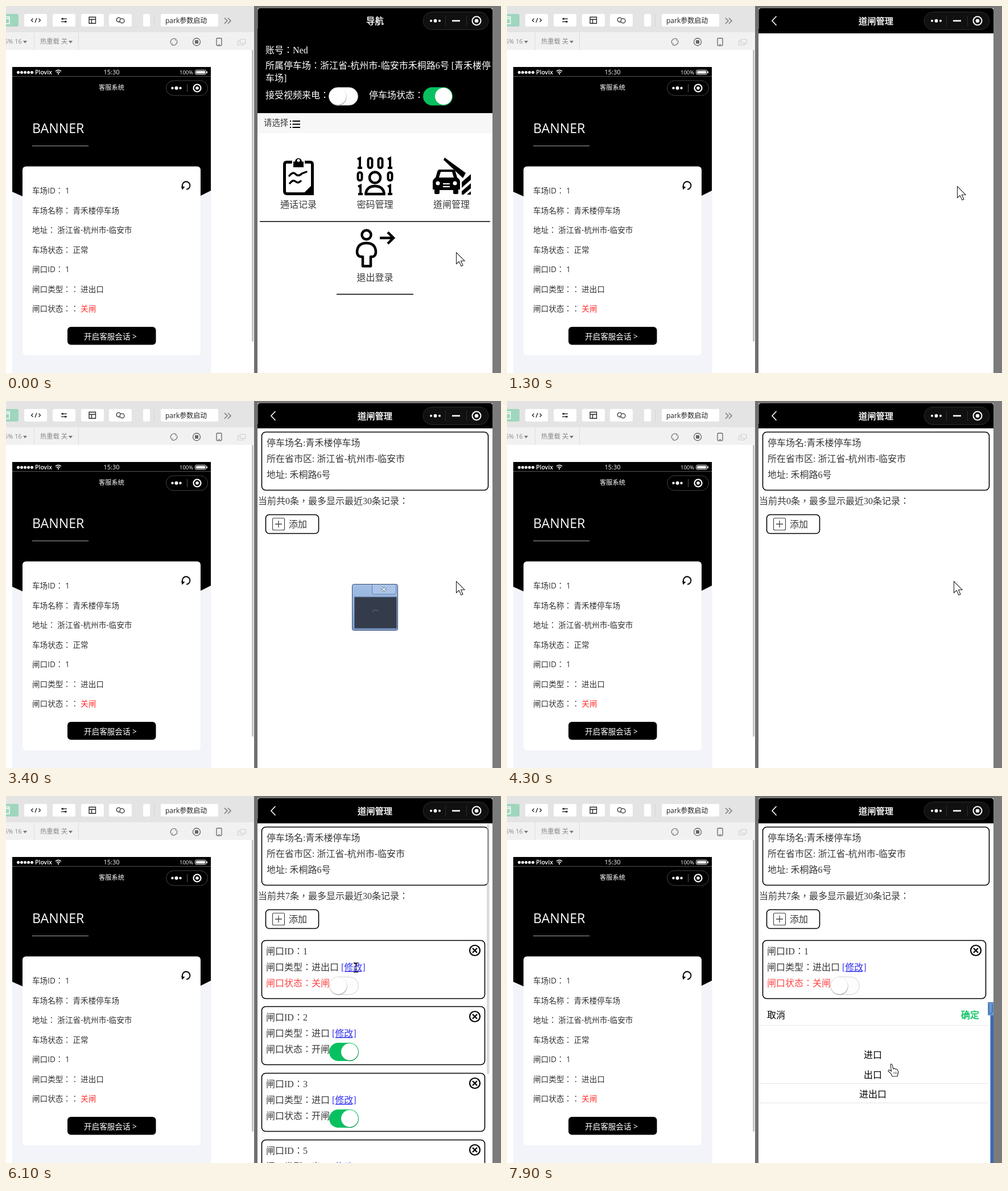
Write an HTML page that moves like this. It is 870 by 644 pixels and loops after 8 s.

```html
<!DOCTYPE html>
<html lang="zh-TW">
<head>
<meta charset="utf-8">
<title>道闸管理</title>
<style>
html, body { margin: 0; width: 100%; height: 100%; overflow: hidden; background: #fff; }
svg { display: block; width: 870px; height: 644px; }
text { white-space: pre; text-spacing-trim: space-all; }
.ui { font-family: 'Open Sans', 'Noto Sans CJK TC', 'Noto Sans CJK', sans-serif; }
.app { font-family: 'Liberation Serif', 'Noto Sans CJK TC', 'Noto Sans CJK', serif; font-weight: 300; }
.head { font-family: 'Noto Sans CJK SC', 'Noto Sans CJK', sans-serif; }
.strong { stroke-width: .45px; }
</style>
</head>
<body>
<svg id="stage" viewBox="0 0 870 644" width="870" height="644"></svg>
<script>
const LOT = '青禾楼停车场', CITY = '浙江省-杭州市-临安市', ROAD = '禾桐路6号';
const INK = '#383838';

const text = (x, y, s, size, fill, cls, extra = '') =>
  `<text x="${x}" y="${y}" font-size="${size}" fill="${fill}" class="${cls}" ${extra}>${s}</text>`;
const ui = (x, y, s, size, fill, extra) => text(x, y, s, size, fill, 'ui', extra);
const app = (x, y, s, fill = INK, extra) => text(x, y, s, 16, fill, 'app', extra);
const strong = (x, y, s, size, fill, extra = '') => text(x, y, s, size, fill, 'head strong', `stroke="${fill}" ${extra}`);
const mid = 'text-anchor="middle"';
const box = (x, y, w, h, fill, r = 0, extra = '') =>
  `<rect x="${x}" y="${y}" width="${w}" height="${h}" fill="${fill}" rx="${r}" ${extra}/>`;
const card = (x, y, w, h, r) => box(x, y, w, h, '#fff', r, 'stroke="#000" stroke-width="1.6"');
const dot = (x, y, r, fill, extra = '') => `<circle cx="${x}" cy="${y}" r="${r}" fill="${fill}" ${extra}/>`;
const path = (d, color, w = 1, extra = '') =>
  `<path d="${d}" fill="none" stroke="${color}" stroke-width="${w}" ${extra}/>`;
const shape = (d, fill, extra = '') => `<path d="${d}" fill="${fill}" ${extra}/>`;
const ring = (x, y, r, color, w) => dot(x, y, r, 'none', `stroke="${color}" stroke-width="${w}"`);
const group = (id, s) => `<g id="${id}">${s}</g>`;

function toggle(x, y, on) {
  const track = on
    ? box(x, y, 52, 32, '#07c160', 16)
    : box(x + .5, y + .5, 51, 31, '#fdfdfd', 15.5, 'stroke="#d2d2d2"');
  const cx = on ? x + 36 : x + 16, cy = y + 16;
  return track + dot(cx + .3, cy + 1, 15.3, on ? '#04994a' : '#aaa') + dot(cx, cy, 15, '#fff');
}

function toolbar() {
  let s = box(0, 0, 436, 46, '#e4e4e4') + box(0, 46, 436, 31, '#f1f1f1') +
    box(-20, 14, 42, 22, '#9fd6bd', 3) + path('M0 19H6V31H0M0 22H6', '#fff', 1.3);
  for (const x of [32, 82, 132, 181]) s += box(x, 14, 40, 22, '#fff', 3);
  s += box(241, 14, 12, 22, '#fff', 3) + path('M260.5 14V36', '#d5d5d5') + box(272, 14, 101, 22, '#fff', 2);
  s += path('M47.5 22L44.5 25L47.5 28M57.5 22L60.5 25L57.5 28M54 21L51 29', '#222', 1.3);
  s += path('M97 22.5H107M97 27.5H107', '#333', 1.3) + dot(99.5, 22.5, 1.7, '#333') + dot(104.5, 27.5, 1.7, '#333');
  s += path('M146 19.5H157.5V30.5H146ZM146 23.5H157.5M150.5 23.5V30.5', '#222', 1.3);
  s += path('M200 28H198A3.8 3.8 0 1 1 201.5 22.5', '#333', 1.3) + ring(204, 26, 3.9, '#333', 1.3);
  s += ui(280, 30, 'park参数启动', 12, '#222');
  s += path('M384 21L389 26L384 31M390 21L395 26L390 31', '#808080', 1.7);
  s += ui(-3, 66, '5% 16', 11, '#888') + shape('M30 61H37L33.5 65.5Z', '#777');
  s += path('M49.5 46V77M127.5 46V77', '#dedede');
  s += ui(60, 66, '热重载 关', 11.3, '#888') + shape('M110 61H117L113.5 65.5Z', '#777');
  s += path('M290 66A6 6 0 0 1 299 58.5M300 60A6 6 0 0 1 291 67.5', '#777', 1.3) +
    path('M296 57L299.5 59L297 61M294 69L290.5 67L293 65', '#777');
  s += ring(335, 63, 6.5, '#666', 1.3) + box(332, 60, 6, 6, '#666');
  s += box(370, 56.5, 9, 13, 'none', 1.5, 'stroke="#666" stroke-width="1.3"') + path('M373 67.5H376', '#666');
  s += path('M411.5 58.5H421V65.5H411.5ZM411 61H407.5V68.5H417.5V66', '#d0d0d0', 1.2);
  return s;
}

function phone() {
  let s = box(11, 107, 349.5, 540, '#f3f4f9') + shape('M11 107H360V324L342 333L185 400L29 334L11 326Z', '#000');
  for (let i = 0; i < 5; i++) s += dot(21.5 + i * 6, 116.5, 2.5, '#fff');
  s += ui(51, 120, 'Plovix', 10.5, '#fff', 'font-weight="600"');
  s += path('M87 114.5Q92 110.5 97 114.5M89 117Q92 114.5 95 117', '#fff', 1.3) + dot(92, 119, 1.2, '#fff');
  s += ui(185.5, 120, '15:30', 11, '#fff', mid) + ui(305, 120, '100%', 9.5, '#fff');
  s += box(332.5, 112.5, 19, 7.5, 'none', 2, 'stroke="#fff"') + box(334, 114, 16, 4.5, '#fff', 1) + box(352.5, 114.5, 1.5, 3.5, '#fff');
  s += path('M11 123.5H360', '#555') + ui(185.5, 147, '客服系统', 11.2, '#fff', mid);
  s += box(281.5, 131, 73, 26, '#000', 13, 'stroke="#444"') + path('M318.5 137V151', '#555');
  s += dot(292.5, 144, 2.2, '#fff') + dot(299.5, 144, 3, '#fff') + dot(306.5, 144, 2.2, '#fff');
  s += ring(336, 144, 6.5, '#fff', 2.2) + dot(336, 144, 2.8, '#fff');
  s += ui(46, 223, 'BANNER', 23.2, '#fff') + path('M46 245.5H145', '#a5a5a5');
  s += box(29, 281.5, 313, 331.5, '#fff', 6);
  s += path('M311.5 319.5A6.8 6.8 0 1 1 317 321.8', '#111', 2.1) + shape('M308 316L314.5 317.5L309.5 322.5Z', '#111');
  const rows = ['车场ID： 1', '车场名称： ' + LOT, '地址： ' + CITY, '车场状态： 正常', '闸口ID： 1',
    '闸口类型：： 进出口', '闸口状态：： <tspan fill="#f33">关闸</tspan>'];
  rows.forEach((r, i) => s += ui(46, 329 + i * 34.5, r, 13.6, '#333'));
  s += box(108, 563, 155.5, 31.5, '#000', 6) + ui(137, 585, '开启客服会话 &gt;', 13.6, '#fff');
  return s + box(432, 77, 3, 512, '#c4c4c4', 1.5);
}

function icons() {
  const round = 'stroke-linecap="round" stroke-linejoin="round"';
  // clipboard
  let s = path('M503 274H493Q489.5 274 489.5 278V325Q489.5 329.5 494 329.5H526L538.5 317V278Q538.5 274 535 274H525', '#000', 5) +
    shape('M541 311V332H520Z', '#000') + shape('M505 283V273H508A6 6 0 1 1 520 273H523V283Z', '#000') + dot(514, 271, 2.5, '#fff') +
    path('M498 298Q504 290 509 295T520 294L528 291M499 311Q504 304 509 308T518 307', '#000', 3.4, round);
  // digits and person
  const one = (x, y, h) => path(`M${x - 4} ${y + 4}L${x} ${y + 2}V${y + h - 2}M${x - 4} ${y + h - 2}H${x + 4}`, '#000', 4);
  const zero = (x, y, h) => box(x - 3.5, y + 2, 7, h - 4, 'none', 3.5, 'stroke="#000" stroke-width="4"');
  s += one(622, 265, 21) + zero(640, 265, 21) + zero(658, 265, 21) + one(675, 265, 21) +
    zero(622, 290, 18) + zero(675, 290, 18) + one(623, 313, 19) + one(675, 313, 19) +
    ring(648.5, 301, 9.5, '#000', 4.5) + path('M632.5 330V328Q635 316 648.5 316T664.5 328V330Z', '#000', 4.5);
  // car and barrier
  s += shape('M762 287H785Q789 287 790 291L793 301Q798 304 798 309V322H795V328Q795 330 793 330H788Q786 330 786 328V323H762V328Q762 330 760 330H755Q753 330 753 328V322H750V309Q750 304 755 301L758 291Q759 287 762 287Z', '#000') +
    shape('M764 291H784L787 301H761Z', '#fff') + dot(759, 311, 3.5, '#fff') + dot(789, 311, 3.5, '#fff') + path('M768 312H780M768 317H780', '#fff', 1.8) +
    shape('M771 266L808 293L803 302L769 270Z', '#000') +
    shape('M817 295V305L801 319V309ZM817 311V320L804 331H801V325ZM817 325V331H810Z', '#000');
  // leaving person
  s += ring(633.5, 401.5, 8, '#000', 4.5) +
    path('M627 456.5V440Q617 441 617 431Q618 416 633.5 416T650 431Q650 441 641 440V456.5Z', '#000', 4.5, round) +
    path('M657 407H680M671 397L681 407L671 417', '#000', 4.5);
  return s;
}

function navPage() {
  const white = '#fff';
  let s = box(442, 40, 413, 604, '#fff') + box(442, 40, 413, 148, '#000') + strong(648.5, 31.5, '导航', 15.5, white, mid);
  s += app(456, 83, '账号：Ned', white) + app(456, 110, `所属停车场：${CITY}${ROAD} [${LOT.slice(0, 4)}`, white) +
    app(456, 132, LOT.slice(4) + ']', white) + app(456, 162, '接受视频来电：', white) + app(638, 162, '停车场状态：', white);
  s += toggle(567, 142.5, false) + toggle(733, 142.5, true);
  s += box(442, 188, 413, 35, '#f7f7f7') + text(453, 210, '请选择', 14.4, INK, 'app');
  s += path('M503.5 202H517M503.5 207.5H517M503.5 213H517M499 202H501M499 207.5H501M499 213H501', '#000', 1.8);
  s += icons();
  ['通话记录', '密码管理', '道闸管理'].forEach((n, i) => s += app(514 + i * 134.5, 354, n, INK, mid));
  s += app(648.5, 482, '退出登录', INK, mid);
  return s + path('M446 378.3H851M581 505.8H716', '#000', 1.4);
}

function gate(i, id, kind, open) {
  const y = Math.floor(i * 116.7), state = open ? INK : '#f44';
  const link = '<tspan fill="#33e" text-decoration="underline">[修改]</tspan>';
  return `<g transform="translate(0 ${y})">` + card(449.5, 253.5, 392, 102, 7) + app(457, 278, '闸口ID：' + id) +
    app(457, 306, `闸口类型：${kind} ${link}`) + app(457, 334, '闸口状态：' + (open ? '开闸' : '关闸'), state) +
    toggle(568, 317, open) + ring(824, 271, 9, '#000', 2.2) +
    path('M820 267L828 275M820 275L828 267', '#000', 2.4) + '</g>';
}

function gatePage() {
  const head = box(442, 40, 413, 604, '#fff') + box(442, 40, 413, 8, '#000') +
    strong(648.5, 31.5, '道闸管理', 15.3, '#fff', mid) + path('M473.5 18L466 26L473.5 34', '#fff', 1.6);
  const info = card(449.5, 54.5, 398, 102, 7) +
    app(458, 79, '停车场名:' + LOT) + app(458, 107, '所在省市区: ' + CITY) + app(458, 135, '地址: ' + ROAD) +
    app(443, 181, '当前共<tspan id="count">0</tspan>条，最多显示最近30条记录：') +
    card(456.5, 199.5, 93, 33, 6) +
    box(468.5, 205.5, 21, 21, 'none', 2, 'stroke="#444" stroke-width="1.2"') +
    path('M473 216H485M479 210V222', '#444', 1.3) + app(497, 222, '添加');
  const list = gate(0, 1, '进出口', false) +
    group('rest', gate(1, 2, '进口', true) + gate(2, 3, '进口', true) + gate(3, 5, '出口', true));
  return head + group('info', info) + group('list', list) + box(845, 49, 4.5, 439, '#c4c4c4', 2, 'id="bar"');
}

const modal = () =>
  box(608.5, 321.5, 80, 81, 'url(#glass)', 3, 'stroke="#3a4c6c"') +
  shape('M643.5 322V336Q643.5 339 647 339H682Q685.5 339 685.5 336V322', '#a9c4e8', 'stroke="#6580a8"') +
  path('M660.5 327.5L667.5 333.5M660.5 333.5L667.5 327.5', '#4a5870', 3.6) +
  path('M660.5 327.5L667.5 333.5M660.5 333.5L667.5 327.5', '#f4f7fb', 1.8) +
  box(612.5, 344, 74, 55, '#343c4c', 0, 'stroke="#53688c"') +
  path('M655 370A8 8 0 0 1 656 381', '#566172', 1.3, 'id="spin"');

function picker() {
  const row = (y, s) => text(643, y, s, 16, '#000', 'head', mid);
  const panel = text(457, 390, '取消', 16, '#000', 'head') + strong(798, 390, '确定', 16, '#07c160') +
    path('M443 402.5H845M443 504.5H845M443 538.5H845', '#e5e5e5') +
    row(460, '进口') + row(495, '出口') + row(529, '进出口');
  return box(443, 362, 412, 282, '#fff') + box(845, 362, 10, 23, '#6a9bd8') +
    path('M845 362.5H855M847 365V381Q852 384 853 378V365', '#315f9f', 1.2) + box(849.5, 385, 5.5, 259, '#3c69b0') +
    `<g clip-path="url(#sheet)">${group('panel', panel)}</g>`;
}

const frame = () =>
  box(436, 0, 434, 4, '#777') + box(436, 0, 6.5, 644, '#707070') + box(855, 0, 15, 644, '#7b7b7b') +
  box(442.5, 4, 412.5, 44, '#000', 4);

const capsule = () =>
  box(733, 10.5, 115, 31, '#101010', 15.5, 'stroke="#2c2c2c"') + path('M772.5 17V35M809.5 17V35', '#2c2c2c') +
  dot(747, 26, 2, '#fff') + dot(754.5, 26, 2.9, '#fff') + dot(762, 26, 2, '#fff') +
  path('M784 26H798', '#fff', 2.6) + ring(827, 26, 7.5, '#fff', 2) + dot(827, 26, 3.3, '#fff');

const cursors = () =>
  group('arrow', shape('M.5 .5V20.5L5.2 16.3L9 24.5L12 23.2L8.5 15.2H15Z', '#fff', 'stroke="#222" stroke-width="1.1"')) +
  group('ibeam', path('M-4 -8H-1L0 -7L1 -8H4M0 -7V7M-4 8H-1L0 7L1 8H4', '#111', 1.4)) +
  group('hand', shape('M1 1Q3 -1 4 2L6 9L8 8L10 9.5L12 9L13.5 11L15 14L14 18L13 22H4L2 17L-3 13Q-3 10 0 11L2.5 13Z', '#fff', 'stroke="#222" stroke-width="1.1"') +
    path('M7 14V18M9.5 14V18M12 14V18', '#444', .8));

document.getElementById('stage').innerHTML =
  '<defs><linearGradient id="glass" x2="0" y2="1"><stop stop-color="#a3bfe6"/><stop offset="1" stop-color="#7f9fce"/></linearGradient>' +
  '<clipPath id="sheet"><rect x="443" y="362" width="402" height="282"/></clipPath></defs>' +
  box(0, 0, 870, 644, '#fff') + toolbar() + phone() + frame() +
  group('nav', navPage()) + group('gates', gatePage()) + capsule() +
  group('modal', modal()) + group('picker', picker()) + group('cursor', cursors());

const $ = id => document.getElementById(id);
const show = (id, on) => $(id).style.display = on ? '' : 'none';
const clamp = (v, lo, hi) => Math.min(hi, Math.max(lo, v));

// time, x, y
const route = [[0, 791, 432], [200, 791, 432], [400, 786, 385], [700, 791, 316], [3400, 791, 316], [3800, 785, 316],
  [4700, 785, 316], [5200, 660, 308], [5400, 604, 301], [5600, 615, 301], [6300, 615, 301], [6600, 580, 320],
  [6800, 611, 300], [7200, 611, 300], [7700, 673, 470], [8000, 673, 470]];

function place(t) {
  const i = Math.max(1, route.findIndex(k => k[0] > t));
  const [t0, x0, y0] = route[i - 1], [t1, x1, y1] = route[i];
  const p = (t - t0) / (t1 - t0), e = p * p * (3 - 2 * p);
  return [x0 + (x1 - x0) * e, y0 + (y1 - y0) * e];
}

function draw(ms) {
  const t = Math.floor(ms / 100) * 100;
  show('nav', t < 1300);
  show('gates', t >= 1300);
  show('info', t >= 1700);
  show('list', t >= 4400);
  show('rest', t < 7200);
  $('count').textContent = t < 4400 ? 0 : 7;

  show('modal', t >= 1500 && t < 4200);
  $('modal').setAttribute('opacity', t < 4100 ? 1 : .4);
  const ticks = clamp(t / 100 - 16, 0, 8) + (t >= 2700) + clamp(t / 100 - 29, 0, 9) + (t >= 3900);
  $('spin').setAttribute('transform', `rotate(${(ticks - 5) * 30} 649 375.5)`);

  show('bar', t >= 4800 && t < 6200);
  $('bar').setAttribute('opacity', t < 6100 ? 1 : .6);

  show('picker', t >= 7200);
  const left = 1 - clamp((t - 7200) / 400, 0, 1);
  $('panel').setAttribute('transform', `translate(0 ${282 * left * left})`);

  const [x, y] = place(t);
  const kind = t >= 7500 ? 'hand' : t >= 5300 && t < 7300 ? 'ibeam' : 'arrow';
  for (const id of ['arrow', 'ibeam', 'hand']) show(id, id === kind);
  $('cursor').setAttribute('transform', `translate(${Math.round(x)} ${Math.round(y)})`);
}

function loop() {
  draw(performance.now() % 8000);
  requestAnimationFrame(loop);
}
loop();
</script>
</body>
</html>
```
